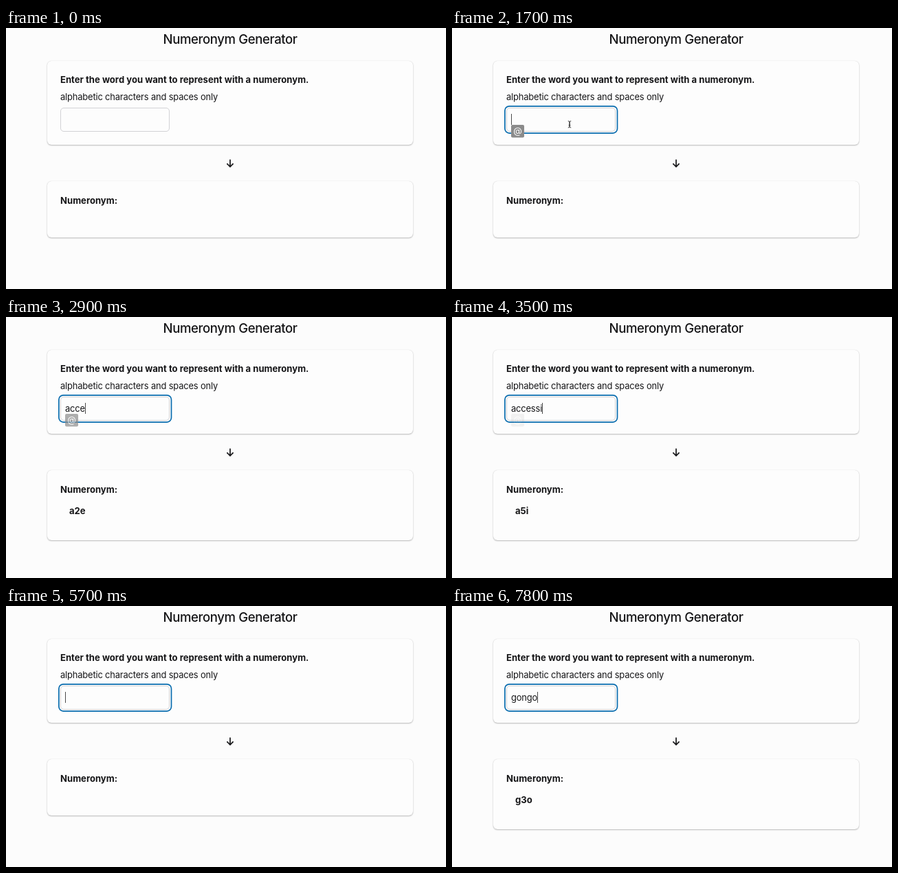
Recreate the animation shown at these times as an HTML page. Size 640 px wide and 380 px high, loop 8000 ms.

```html
<!DOCTYPE html>
<html lang="en">
<head>
<meta charset="utf-8">
<title>Numeronym Generator</title>
<style>
  html, body { margin: 0; width: 100%; height: 100%; overflow: hidden; background: #fcfcfc; }
  body { position: relative; }

  .card {
    position: absolute; left: 60px; width: 532px; border-radius: 6px; background: #fdfdfd;
    box-shadow: 0 1px 2px rgba(0, 0, 0, .26), 0 0 1px rgba(0, 0, 0, .16);
  }
  .entry { top: 48px; height: 122px; }
  .result { top: 223px; height: 82px; }
  .result.filled { height: 102px; }

  svg { position: absolute; left: 0; top: 0; }
  text { font: 12.9px Inter, "Open Sans", sans-serif; letter-spacing: -.16px; fill: #161618; }
  .title { font-size: 18.6px; font-weight: 450; letter-spacing: -.42px; }
  .bold { font-size: 13.1px; font-weight: 700; letter-spacing: 0; }
  .at { font-size: 13px; letter-spacing: 0; fill: #fff; text-anchor: middle; }

  .timed { animation: 8s step-end infinite; }
  .pointer { animation-name: pointer; }
  .beam { animation-name: beam; }
  .ring { animation-name: ring; }
  .badge { animation-name: badge; }
  .caret { animation-name: caret; }
  .selection { animation-name: selection; }

  @keyframes pointer {
    0% { opacity: 0; transform: translate(228px, 338px); }
    7.5% { opacity: 1; transform: translate(228px, 338px); }
    8.75% { opacity: 1; transform: translate(210px, 235px); }
    10% { opacity: 1; transform: translate(210px, 235px); animation-timing-function: steps(4, end); }
    15% { opacity: 1; transform: translate(172px, 142px); }
    15.01%, 100% { opacity: 0; transform: translate(172px, 142px); }
  }
  @keyframes beam {
    0% { opacity: 0; }
    15% { opacity: 1; }
    28.75%, 100% { opacity: 0; }
  }
  @keyframes ring {
    0% { opacity: 0; }
    16.25%, 100% { opacity: 1; }
  }
  @keyframes badge {
    0% { opacity: 0; }
    16.25% { opacity: 0; animation-timing-function: steps(4, end); }
    21.25% { opacity: 1; }
    32.5% { opacity: 1; animation-timing-function: steps(10, end); }
    45%, 100% { opacity: 0; }
  }
  @keyframes caret {
    0% { opacity: 0; }
    16.25% { opacity: 1; }
    61.25% { opacity: .4; }
    62.5% { opacity: 0; }
    71.25% { opacity: 1; }
    90% { opacity: .7; }
    91.25% { opacity: .3; }
    92.5% { opacity: 0; }
    96.25% { opacity: .5; }
    97.5%, 100% { opacity: 1; }
  }
  @keyframes selection {
    0% { opacity: 0; }
    66.25% { opacity: 1; }
    71.25%, 100% { opacity: 0; }
  }
</style>
</head>
<body>
<div class="card entry"></div>
<div class="card result" id="result"></div>

<svg width="640" height="380">
  <text class="title" x="228.6" y="22.6">Numeronym Generator</text>
  <text class="bold" x="79" y="80.4">Enter the word you want to represent with a numeronym.</text>
  <text x="79" y="104.6">alphabetic characters and spaces only</text>
  <text class="bold" x="79" y="256">Numeronym:</text>
  <text class="bold" x="92" y="287" id="numeronym"></text>

  <path d="M326 191.5V202M321.4 197.4L326 202L330.6 197.4" fill="none" stroke="#161618" stroke-width="1.7"/>

  <rect x="79.5" y="116.5" width="158" height="34" rx="4.5" fill="#fdfdfd" stroke="#d2d2d5"/>
  <rect class="timed ring" x="76.9" y="113.8" width="163.6" height="39.3" rx="6.5" fill="none" stroke="#086cae" stroke-width="1.7"/>

  <rect class="timed selection" id="selection" x="86" y="125" height="17" fill="#b5d5fb"/>
  <g class="timed badge">
    <rect x="86" y="141" width="19" height="18.5" rx="2" fill="#8b8b8b"/>
    <text class="at" x="95.5" y="154.4">@</text>
  </g>
  <text x="86" y="138" id="word"></text>
  <rect class="timed caret" id="caret" y="125" width="1" height="16" fill="#4a4a4a"/>

  <path class="timed beam" d="M168.8 135.5Q171 135.5 171 137V143.5Q171 145 168.8 145M173.2 135.5Q171 135.5 171 137V143.5Q171 145 173.2 145M169.7 141.5H172.3" fill="none" stroke="#333"/>
  <path class="timed pointer" d="M.5 .5V10L2.7 8L4.2 11.4L5.8 10.7L4.3 7.4H7.3Z" fill="#111" stroke="#fff" stroke-width=".7"/>
</svg>

<script>
  const LOOP = 8000, TEXT_X = 86;
  const [result, numeronym, selection, word, caret] =
    ["result", "numeronym", "selection", "word", "caret"].map(id => document.getElementById(id));

  // Each entry types one word; keys holds the moment of every letter.
  const entries = [
    { text: "accessibility", clear: 5700,
      keys: [2300, 2500, 2700, 2900, 3100, 3300, 3500, 3700, 3900, 4100, 4300, 4500, 4600] },
    { text: "gongo", clear: LOOP, keys: [6100, 6400, 6500, 6600, 6700] }
  ];

  function typedAt(time) {
    const { text, keys } = entries.find(entry => time < entry.clear);
    return text.slice(0, keys.filter(key => key <= time).length);
  }

  const shorten = text => text.length < 3 ? text : text[0] + (text.length - 2) + text.at(-1);

  let start;
  function render(now) {
    start ??= now;
    const typed = typedAt((now - start) % LOOP);
    word.textContent = typed;
    numeronym.textContent = shorten(typed);
    result.classList.toggle("filled", typed !== "");
    const width = typed ? word.getComputedTextLength() : 0;
    caret.setAttribute("x", Math.round(TEXT_X + width + .3));
    selection.setAttribute("width", width);
    requestAnimationFrame(render);
  }
  requestAnimationFrame(render);
</script>
</body>
</html>
```
